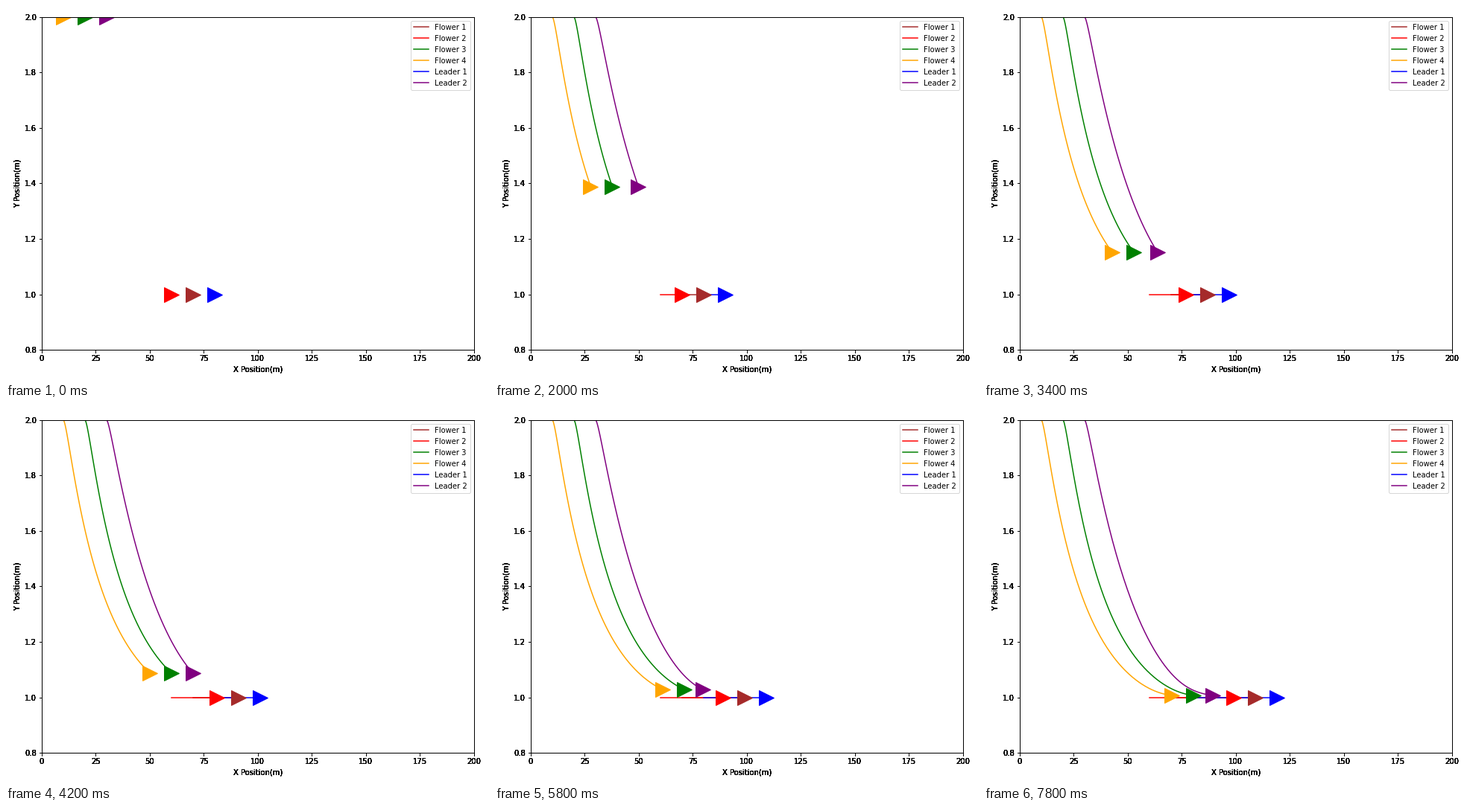
Animation of 648 by 504 pixels, one loop 8000 ms. Source, as a matplotlib script:

```python
import numpy as np
import matplotlib.pyplot as plt
from matplotlib.animation import FuncAnimation

FRAMES, INTERVAL = 40, 200
SUB = 4          # trail samples per frame
LAYERS = 6       # stacked axes, which darken the tick and axis text


def damped(t, rate, freq, b):
    """Decaying oscillation that starts at 1."""
    return np.exp(-rate * t) * (np.cos(freq * t) + b * np.sin(freq * t))


def cruise(start):
    """Straight run along the lower lane."""
    return lambda t: (start + t, np.ones_like(t))


def lane_change(t):
    """Overdamped descent from the upper lane to the lower one."""
    a, b = 0.14, 0.355
    return 1 + (b * np.exp(-a * t) - a * np.exp(-b * t)) / (b - a)


def leader(t):
    return 50 + t - 20 * damped(t, 0.109, 0.101, 1.15), lane_change(t)


def follower(start):
    def path(t):
        gap = damped(t, 0.072, 0.098, 0.8) + 0.016 * np.sin(2 * np.pi * t / 33)
        return start + 20 + t - 20 * gap, lane_change(t)
    return path


VEHICLES = [
    ("Flower 1", "brown", cruise(70)),
    ("Flower 2", "red", cruise(60)),
    ("Flower 3", "green", follower(20)),
    ("Flower 4", "orange", follower(10)),
    ("Leader 1", "blue", cruise(80)),
    ("Leader 2", "purple", leader),
]

fig = plt.figure(figsize=(9, 7), dpi=72)
layers = [fig.add_subplot(111) for _ in range(LAYERS)]
for layer in layers:
    layer.set(xlim=(0, 200), ylim=(0.8, 2.0), facecolor="none",
              xlabel="X Position(m)", ylabel="Y Position(m)")
ax = layers[0]

trails, heads = [], []
for name, color, _ in VEHICLES:
    trails += ax.plot([], [], color=color, lw=1.5, label=name)
    heads += ax.plot([], [], ">", color=color, ms=20, zorder=2.2)
ax.legend(loc="upper right")
fig.tight_layout()


def draw(frame):
    t = np.linspace(0, frame, frame * SUB + 1)
    for (_, _, path), trail, head in zip(VEHICLES, trails, heads):
        x, y = path(t)
        trail.set_data(x, y)
        head.set_data(x[-1:], y[-1:])
    return trails + heads


anim = FuncAnimation(fig, draw, frames=FRAMES, interval=INTERVAL,
                     init_func=lambda: draw(0), repeat=True, repeat_delay=0)
plt.show()
```
